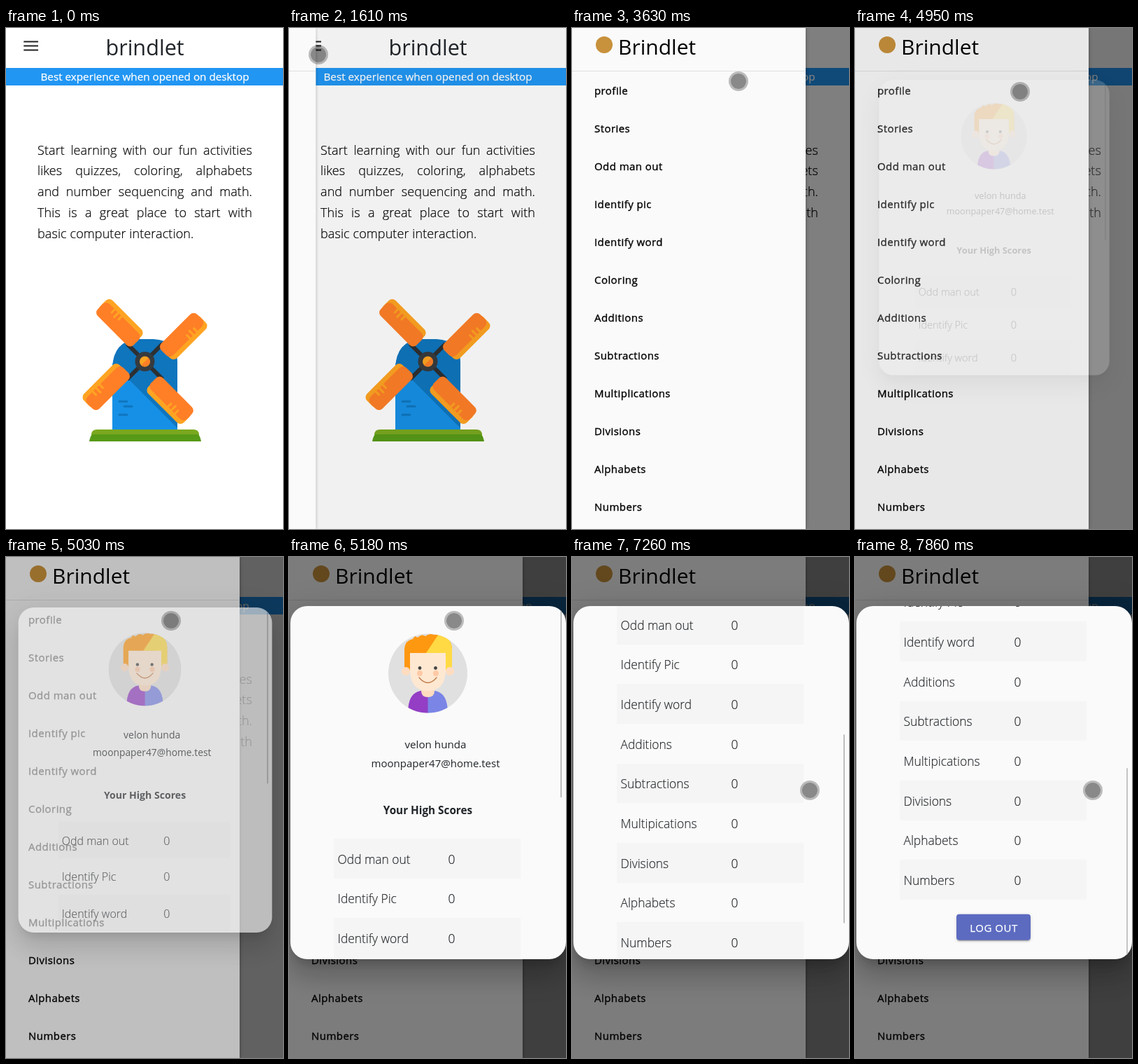
These frames come from a looping animation (396x715 px, 8 s). An HTML page:

```html
<!DOCTYPE html>
<html lang="en">
<head>
<meta charset="utf-8">
<title>Learning app menu</title>
<style>
html, body { margin: 0; width: 100%; height: 100%; overflow: hidden; background: #fff; }
body { position: relative; font-family: "Open Sans", "Noto Sans", sans-serif; color: #212529; }
div, svg { position: absolute; }
#stage { left: 0; top: 0; width: 396px; height: 715px; overflow: hidden; }
svg { left: 0; top: 0; overflow: visible; }
/* zero line height centres the text on its top coordinate */
.t { line-height: 0; white-space: nowrap; }
.mid { transform: translateX(-50%); }
.shade { inset: 0; background: #000; opacity: 0; }
#strip { top: 57px; width: 396px; height: 24.5px; background: #2196f3; color: #fff; font-size: 15.25px; -webkit-text-stroke: .25px; }
#intro { left: 45px; top: 159.5px; width: 307px; color: #000; font-size: 18px; font-weight: 300; line-height: 29.8px; letter-spacing: .1px; -webkit-text-stroke: .2px; }
#intro div { position: static; text-align-last: justify; }
#intro div:last-child { text-align-last: left; }
#drawer { width: 333.5px; height: 715px; background: #fafafa; color: #000; box-shadow: 0 8px 10px -5px #0003, 0 0 5px #0005; }
#rule { top: 61px; width: 333px; height: 1px; background: #e0e0e0; }
#logo { left: 34px; top: 12px; width: 24px; height: 24px; border-radius: 50%; background: #c8913c; }
.item { left: 32px; font-size: 15px; letter-spacing: .43px; -webkit-text-stroke: .35px; }
#dialog { left: 2px; top: 70px; width: 394px; height: 504px; border-radius: 24px; overflow: hidden; background: #fafafa;
  transform-origin: 197px 25px;
  box-shadow: 0 11px 15px -7px #0003, 0 24px 38px 3px #00000024, 0 9px 46px 8px #0000001f; }
#origin { left: -2px; top: -70px; }
.row { left: 64px; width: 267px; height: 56.67px; font-size: 17.4px; font-weight: 300; -webkit-text-stroke: .15px; }
.row:nth-child(odd) { background: #f5f5f5; }
.row .t { top: 28.5px; }
#button { left: 145px; top: 933px; width: 106px; height: 37px; border-radius: 4px; background: #5c6bc0;
  color: #fff; font-size: 15px; letter-spacing: .5px; -webkit-text-stroke: .25px;
  box-shadow: 0 3px 1px -2px #0003, 0 2px 2px #00000024, 0 1px 5px #0000001f; }
#bar { left: 387.5px; top: 74px; width: 2.5px; height: 269px; background: #bdbdbd; }
#cursor { width: 22px; height: 22px; margin: -14px; border: 3px solid #00000040; border-radius: 50%; background: #00000073; background-clip: padding-box; }
</style>
</head>
<body>
<div id="stage">
  <svg width="396" height="715">
    <path d="M25.3 19.5h20.7M25.3 25.5h20.7M25.3 31.5h20.7" stroke="#212121" stroke-width="2"/>
    <path d="M152 573V484Q154 447 187 444H211Q245 446 245 476V573Z" fill="#0f75bd"/>
    <path d="M152 478L245 571V573H152Z" fill="#1690e6"/>
    <path d="M162 533h11M169 540h11M162 552h11" stroke="#0f75bd" stroke-width="3" stroke-linecap="round"/>
    <path d="M122 581Q122 573 130 573H268Q276 573 276 581Z" fill="#7aa81f"/>
    <path d="M119 590Q121 580 124 580H274Q277 580 279 590Z" fill="#579a17"/>
    <g id="mill" transform="translate(198.5 476)">
      <g id="sails"></g>
      <circle r="14" fill="#373b3e"/>
      <circle r="7.5" fill="#ffa422"/>
      <path d="M5.3-5.3A7.5 7.5 0 0 1-5.3 5.3Z" fill="#ff7f27"/>
    </g>
  </svg>
  <div class="t mid" style="left:198.5px;top:27px;font-size:30.6px">brindlet</div>
  <div id="strip"><div class="t mid" style="left:198.5px;top:12px">Best experience when opened on desktop</div></div>
  <div id="intro">
    <div>Start learning with our fun activities</div>
    <div>likes quizzes, coloring, alphabets</div>
    <div>and number sequencing and math.</div>
    <div>This is a great place to start with</div>
    <div>basic computer interaction.</div>
  </div>
  <div class="shade" id="shade1"></div>
  <div id="drawer">
    <div id="logo"></div>
    <div class="t" style="left:66px;top:27px;font-size:30px">Brindlet</div>
    <div id="rule"></div>
    <div id="items"></div>
  </div>
  <div class="shade" id="shade2"></div>
  <div id="dialog"><div id="origin">
    <div id="content">
      <svg width="396" height="300">
        <clipPath id="round"><circle cx="198.5" cy="166" r="56.5"/></clipPath>
        <g clip-path="url(#round)">
          <path d="M142 109h113v114h-113z" fill="#e0e0e0"/>
          <path d="M165 162V131Q166 119 177 117L180 113L184 115Q190 109 195 113Q201 108 207 111Q214 109 221 114Q233 118 233 132V162Z" fill="#ff9811"/>
          <path d="M214 110Q233 115 233 132V162H215V137H196Z" fill="#ffda44"/>
          <circle cx="167" cy="163" r="6" fill="#ffdcbf"/>
          <circle cx="230" cy="163" r="6" fill="#ffdcbf"/>
          <path d="M170 223Q170 194 188 191H199V223Z" fill="#933ec5"/>
          <path d="M198.5 191H209Q227 194 227 223H198.5Z" fill="#7b85e6"/>
          <path d="M189 184H208V191Q208 200 198.5 200Q189 200 189 191Z" fill="#ffdcbf"/>
          <path d="M173 137H224V162Q223 191 198.5 191Q174 191 173 162Z" fill="#ffe8d2"/>
          <g fill="#ffc9a5"><circle cx="187" cy="166" r="4"/><circle cx="210" cy="166" r="4"/></g>
          <g fill="#444"><circle cx="187" cy="158.5" r="2.4"/><circle cx="209.5" cy="158.5" r="2.4"/></g>
          <path d="M186 172Q198.5 187 211 172" fill="none" stroke="#c4804f" stroke-width="1.5" stroke-linecap="round"/>
        </g>
      </svg>
      <div class="t mid" style="left:209.5px;top:267px;font-size:15.2px">velon hunda</div>
      <div class="t mid" style="left:209.5px;top:293.5px;font-size:15px">moonpaper47@home.test</div>
      <div class="t mid" style="left:198.5px;top:360.5px;font-size:15.3px;font-weight:700">Your High Scores</div>
      <div id="rows"></div>
      <div id="button"><div class="t mid" style="left:53.5px;top:18.5px">LOG OUT</div></div>
    </div>
    <div id="bar"></div>
  </div></div>
  <div id="cursor"></div>
</div>
<script>
const $ = id => document.getElementById(id);
const clamp = v => Math.min(1, Math.max(0, v));
const span = (t, start, length) => clamp((t - start) / length);
const smooth = u => u * u * (3 - 2 * u);

$('sails').innerHTML = [45, 135, 225, 315].map(angle => `<g transform="rotate(${angle})">
  <path d="M0 0V-36" stroke="#2d3032" stroke-width="6"/>
  <rect x="4" y="-101" width="25" height="72" rx="7" fill="#ffa422"/>
  <rect x="-1.7" y="-100.5" width="24" height="72.5" rx="7" fill="#ff7f27"/>
  <path d="M23-69h-7M23-76h-9M23-83h-7" stroke="#ffa422" stroke-width="3" stroke-linecap="round"/></g>`).join('');

$('items').innerHTML = ['profile', 'Stories', 'Odd man out', 'Identify pic', 'Identify word', 'Coloring', 'Additions',
  'Subtractions', 'Multiplications', 'Divisions', 'Alphabets', 'Numbers']
  .map((name, i) => `<div class="t item" style="top:${89.3 + 54 * i}px">${name}</div>`).join('');

$('rows').innerHTML = ['Odd man out', 'Identify Pic', 'Identify word', 'Additions', 'Subtractions', 'Multipications',
  'Divisions', 'Alphabets', 'Numbers']
  .map((name, i) => `<div class="row" style="top:${402 + 56.67 * i}px">
    <div class="t" style="left:5.5px">${name}</div><div class="t" style="left:163.5px">0</div></div>`).join('');

// from, to, x, y
const touches = [[760, 840, 53, 44], [840, 920, 48, 44], [1150, 2450, 42, 38],
  [3630, 4340, 238, 76], [4950, 5790, 236, 91], [6570, 8000, 340, 333]];
const STEP = 8000 / 105;

function draw(now) {
  const time = now % 8000;
  const t = Math.floor((time + 30) / STEP) * STEP;

  const slide = 1 - (1 - span(t, 1580, 400)) ** 2.32;
  $('drawer').style.visibility = slide ? 'visible' : 'hidden';
  $('drawer').style.transform = `translateX(${333 * (slide - 1)}px)`;
  $('shade1').style.opacity = slide / 2;

  const open = span(t, 4920, 180);
  $('dialog').style.opacity = open;
  $('dialog').style.transform = `scale(${.8 + .2 * open})`;
  $('shade2').style.opacity = span(t, 4920, 230) / 2;

  const scroll = 335 * smooth(span(t, 6540, 720)) + 88.3 * smooth(span(t, 7350, 280));
  $('content').style.transform = `translateY(${-scroll}px)`;
  $('bar').style.transform = `translateY(${scroll * .537}px)`;
  $('bar').style.opacity = time >= 5560 && time < 6570 ? 0 : 1 - span(t, 7740, 800);

  const touch = touches.find(([from, to]) => time >= from && time < to);
  $('cursor').style.display = touch ? '' : 'none';
  if (touch) $('cursor').style.transform = `translate(${touch[2]}px, ${touch[3]}px)`;
}

const begin = performance.now();
(function tick() {
  draw(performance.now() - begin);
  requestAnimationFrame(tick);
})();
</script>
</body>
</html>
```
